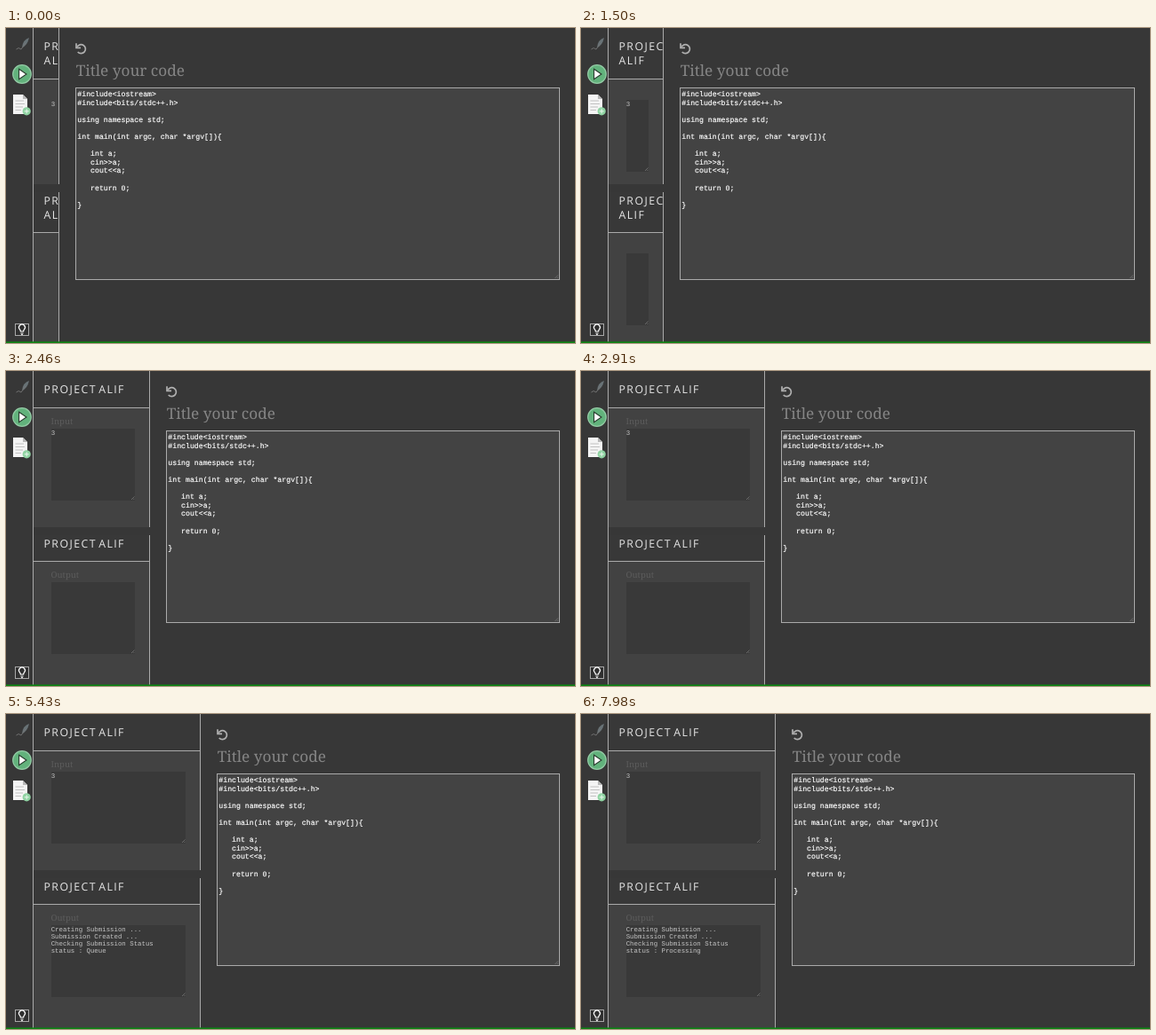
Animation of 640x355 px, one loop 8000 ms. Source, as an HTML page:

```html
<!DOCTYPE html>
<html lang="en">
<head>
<meta charset="utf-8">
<title>Code editor</title>
<style>
  html, body { margin: 0; width: 100%; height: 100%; overflow: hidden; background: #373737; }
  svg { display: block; width: 100vw; height: 100vh; }
  text { white-space: pre; text-rendering: geometricPrecision; }
  .head { font: 12.3px "Open Sans", sans-serif; letter-spacing: 1.45px; word-spacing: -2.4px; fill: #e6e6e6; }
  .label { font: 300 9.5px "Noto Serif", serif; fill: #5c5c5c; }
  .title { font: 300 17.2px "Noto Serif", serif; fill: #858585; }
  .code { font: 8.21px "Liberation Mono", monospace; fill: #fff; stroke: #fff; stroke-width: .18; }
  .io { font: 7.38px "Liberation Mono", monospace; fill: #c6c6c6; }
  .rule { stroke: #aaa; stroke-width: 1; fill: none; }
  .grip { stroke: #8a8a8a; stroke-width: .6; fill: none; }
</style>
</head>
<body>
<svg viewBox="0 0 640 355" preserveAspectRatio="none">
  <defs><clipPath id="clip"><rect id="clipBox" x="30" width="30" height="355"/></clipPath></defs>
  <rect width="640" height="355" fill="#373737"/>

  <g id="panels" clip-path="url(#clip)"></g>
  <path class="rule" d="M30.5 0V354"/>
  <path id="edge" class="rule" d="M-.5 0V176M-.5 185V354"/>

  <g id="editor">
    <g fill="none" stroke="#b0b0b0" stroke-width="1.7">
      <path d="M19.9 21.5A5 5 0 1 1 20.7 27"/>
      <path d="M19 17.2V22.3H24"/>
    </g>
    <text class="title" x="18.7" y="54">Title your code</text>
    <rect id="codeBox" class="rule" x="18.5" y="67.5" height="216" style="fill:#434343"/>
    <g id="code"></g>
  </g>
  <path class="grip" d="M617.5 282L621 278.5M619.8 282L621 280.8"/>

  <g id="sidebar">
    <path d="M26 11Q19 13 18 22Q24 20 26 11Z" fill="#687276"/>
    <path d="M22 17L17 24Q14 21 11.5 24" fill="none" stroke="#777" stroke-width=".9"/>
    <circle cx="18" cy="52" r="10.3" fill="#62b27c" stroke="#93cba5" stroke-width="1.2"/>
    <path d="M14.6 46.2L23 52L14.6 57.8Z" fill="#fff" stroke="#263a2c" stroke-width="1.1"/>
    <path d="M8 75H19L24 80V97H8Z" fill="#f4f4f4"/>
    <path d="M19 75V80H24Z" fill="#b9b9b9"/>
    <path d="M10.5 82H20M10.5 85.5H21M10.5 89H19M10.5 92.5H17" stroke="#b4b4b4" stroke-width=".8"/>
    <circle cx="23.2" cy="93.8" r="4.6" fill="#8fd3a2"/>
    <path d="M20.7 93.8H25.7M23.2 91.3V96.3" stroke="#e8f6ec" stroke-width="1"/>
    <rect x="10.5" y="333.5" width="15" height="13" fill="#303030" stroke="#a8a8a8"/>
    <path d="M16.4 342Q16.4 340.9 15.4 339.7A3.4 3.4 0 1 1 20.6 339.7Q19.6 340.9 19.6 342Z"
          fill="none" stroke="#fff" stroke-width="1.2"/>
    <path d="M16.5 344.1H19.5M17.2 345.5H18.8" stroke="#fff" stroke-width="1"/>
  </g>
  <rect y="353.4" width="640" height="1.6" fill="#0c8412"/>
</svg>

<script>
const LOOP = 8000, WRAP_AT = 146, WRAP_SHIFT = 16;
const $ = id => document.getElementById(id);

function add(parent, tag, attrs, text = "") {
  const el = document.createElementNS("http://www.w3.org/2000/svg", tag);
  for (const k in attrs) el.setAttribute(k, attrs[k]);
  el.textContent = text;
  return parent.appendChild(el);
}

const source = `#include<iostream>
#include<bits/stdc++.h>

using namespace std;

int main(int argc, char *argv[]){

   int a;
   cin>>a;
   cout<<a;

   return 0;

}`;
source.split("\n").forEach((line, i) =>
  add($("code"), "text", { class: "code", x: 20.3, y: 77 + i * 9.6 }, line));

function makePanel(top, bottom, headY, ruleY, name) {
  const g = add($("panels"), "g", {});
  add(g, "rect", { x: 31, y: top, width: 600, height: bottom - top, fill: "#383838" });
  const oneLine = add(g, "text", { class: "head", x: 42.5, y: headY }, "PROJECT ALIF");
  const twoLines = add(g, "g", {});
  ["PROJECT", "ALIF"].forEach((word, i) =>
    add(twoLines, "text", { class: "head", x: 42.5, y: headY + i * WRAP_SHIFT }, word));
  const body = add(g, "rect", { x: 31, width: 600, fill: "#424242" });
  const rule = add(g, "path", { class: "rule", d: `M31 ${ruleY}H640` });
  const content = add(g, "g", {});
  const label = add(content, "text", { class: "label", x: 50.5, y: ruleY + 18 }, name);
  const boxY = ruleY + 23.5;
  const box = add(content, "rect", { x: 51, y: boxY, height: 81, fill: "#393939" });
  const grip = add(content, "path", { class: "grip", d: `M-4 ${boxY + 80}l3.5-3.5M-1.7 ${boxY + 80}l1.2-1.2` });
  const lines = [0, 1, 2, 3].map(i =>
    add(content, "text", { class: "io", x: 50.7, y: boxY + 6.8 + i * 8 }));

  const show = (el, on) => el.setAttribute("visibility", on ? "visible" : "hidden");
  return {
    lines,
    layout(right) {
      const wrapped = right < WRAP_AT, dy = wrapped ? WRAP_SHIFT : 0;
      const width = Math.max(0, right - 68);
      show(oneLine, !wrapped);
      show(twoLines, wrapped);
      show(label, !wrapped);
      show(grip, width > 4);
      body.setAttribute("y", ruleY + dy);
      body.setAttribute("height", bottom - ruleY - dy);
      rule.setAttribute("transform", `translate(0 ${dy})`);
      content.setAttribute("transform", `translate(0 ${dy})`);
      box.setAttribute("width", width);
      grip.setAttribute("transform", `translate(${right - 17} 0)`);
    }
  };
}

const input = makePanel(0, 176, 25, 41.5, "Input");
const output = makePanel(185, 354, 198.5, 214.5, "Output");
input.lines[0].textContent = "3";

// Drag of the divider: time, position
const drag = [[0, 60], [500, 62], [1500, 93.4], [2460, 162], [2910, 207.4], [3180, 219]];

function slope(i) {
  if (i === 0 || i === drag.length - 1) return 0;
  const rate = j => (drag[j + 1][1] - drag[j][1]) / (drag[j + 1][0] - drag[j][0]);
  const a = rate(i - 1), b = rate(i);
  return 2 * a * b / (a + b);
}

function dividerAt(t) {
  const i = drag.findIndex(p => t < p[0]) - 1;
  if (i < 0) return drag[drag.length - 1][1];
  const [t0, x0] = drag[i], [t1, x1] = drag[i + 1];
  const h = t1 - t0, u = (t - t0) / h, v = 1 - u;
  return x0 * v * v * (1 + 2 * u) + x1 * u * u * (3 - 2 * u)
       + h * u * v * (slope(i) * v - slope(i + 1) * u);
}

// Console messages: time, row, text
const messages = [
  [4500, 0, "Creating Submission ..."],
  [4980, 1, "Submission Created ..."],
  [4980, 2, "Checking Submission Status"],
  [5340, 3, "status : Queue"],
  [6700, 3, "status : Processing"]
];

function render(t) {
  const right = Math.round(dividerAt(t));
  $("clipBox").setAttribute("width", right - 30);
  $("edge").setAttribute("transform", `translate(${right} 0)`);
  $("editor").setAttribute("transform", `translate(${right} 0)`);
  $("codeBox").setAttribute("width", 604 - right);
  input.layout(right);
  output.layout(right);

  const rows = ["", "", "", ""];
  for (const [at, row, text] of messages) if (t >= at) rows[row] = text;
  rows.forEach((text, i) => {
    if (output.lines[i].textContent !== text) output.lines[i].textContent = text;
  });
}

const start = performance.now();
function tick() {
  render((performance.now() - start) % LOOP);
  requestAnimationFrame(tick);
}
tick();
</script>
</body>
</html>
```
